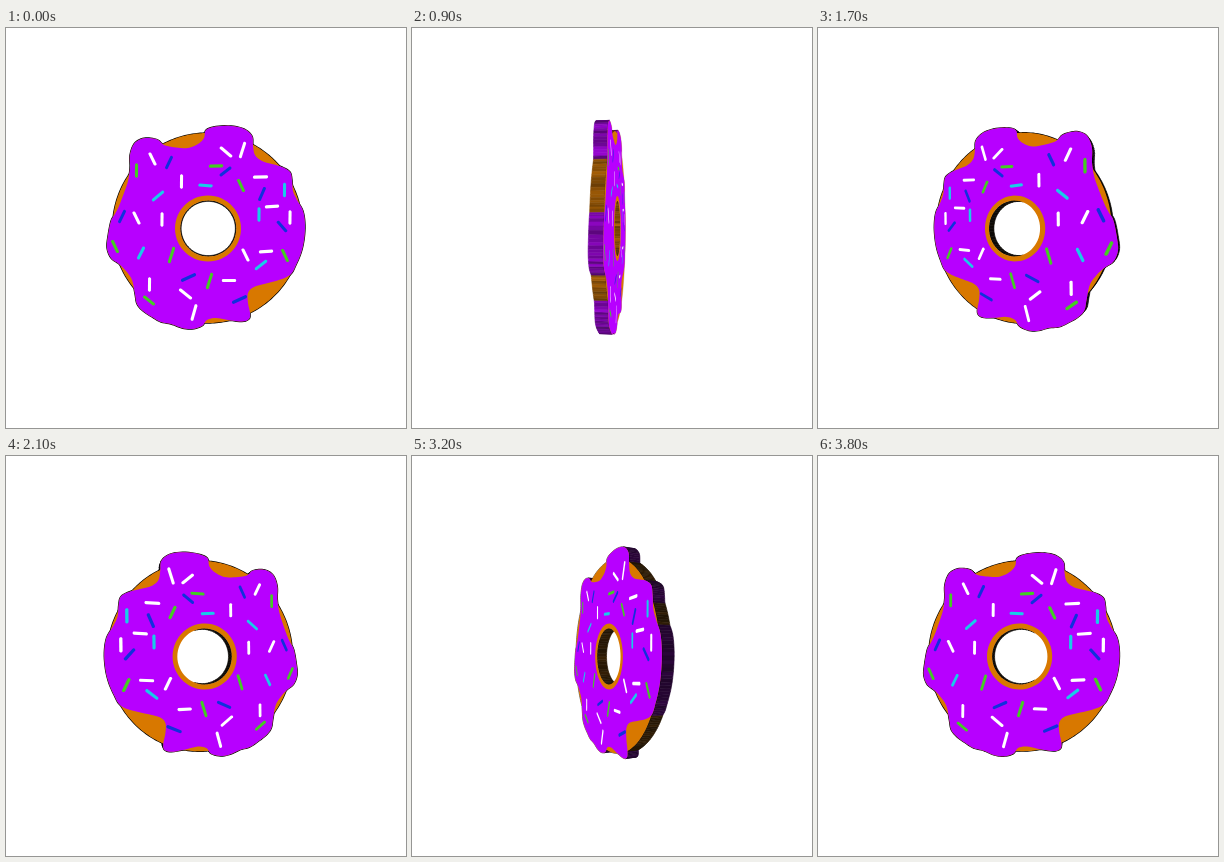
An HTML page with a canvas for the animation above (3900 ms loop, 400 by 400 pixels).

```html
<!DOCTYPE html>
<html lang="en">
<head>
<meta charset="utf-8">
<title>Spinning doughnut</title>
<style>
  html, body { margin: 0; width: 100%; height: 100%; overflow: hidden; background: #fff; }
  canvas { display: block; }
</style>
</head>
<body>
<canvas id="stage" width="400" height="400"></canvas>
<script>
const ctx = document.getElementById('stage').getContext('2d');
const STEPS = 39, STEP_MS = 100;
const CAMERA = 345, HALF_DEPTH = 5.5;
const FRONT_SCALE = CAMERA / (CAMERA - HALF_DEPTH);
const ICING = [183, 0, 255], DOUGH = [216, 120, 0];
const TAU = Math.PI * 2;

// Shapes are given as they appear on the stage when the front faces the viewer.
const toModel = ([x, y]) => [(x - 200) / FRONT_SCALE, (y - 200) / FRONT_SCALE];

const icingKnots = [
  [200, 102], [210, 98.5], [225, 98], [238, 101], [246, 108], [247, 118], [249, 127],
  [256, 133], [266, 136], [276, 139], [284, 144], [286, 152], [287, 163], [291, 172],
  [297, 183], [299, 197], [298, 212], [295, 225], [290, 237], [285, 246], [276, 251],
  [262, 255], [248, 259], [242, 265], [242, 275], [244, 285], [243, 291], [236, 293.5],
  [222, 292], [210, 290], [201, 292], [196, 298], [186, 301], [176, 300], [165, 296],
  [155, 294], [146, 289], [137, 283], [131, 276], [129, 266], [126, 252], [120, 243],
  [113, 236], [105, 230], [101, 220], [102, 208], [105, 193], [109, 186], [113, 178],
  [118, 165], [122, 153], [124, 140], [124, 127], [128, 116], [135, 111], [143, 110],
  [152, 112], [158, 117], [170, 119.5], [182, 120], [192, 116], [198, 110]
];

// Each sprinkle: x, y, angle in degrees, optional half length.
const sprinkles = {
  '#ffffff': [
    [146.5, 131, 63], [220, 124, 40, 6.2], [236.5, 122, 107, 7], [175.5, 153.5, 90],
    [254.5, 149, -2, 6], [130.5, 190, 63], [156, 191.5, 90], [266, 178.5, -4],
    [284, 189.5, 90], [239.5, 227, 63], [260, 223.5, -4], [143.5, 256.5, 90],
    [179.5, 266, 38, 6.4], [188, 284.5, 105, 7], [223, 252.5, 0]
  ],
  '#44cc22': [
    [130.5, 142.5, 90], [210, 138, -2], [235, 157.5, 64], [109, 218.5, 64],
    [165.5, 227, 107, 7], [279, 227.5, 64], [203.5, 253, 107, 7], [143, 272.5, 37]
  ],
  '#1030dd': [
    [163, 134.5, 115], [219.5, 143.5, 141], [256, 166, 113, 6], [116, 188.5, 115],
    [276, 198.5, 48], [182.5, 249.5, 155, 6.6], [233.5, 271.5, 155, 6.6]
  ],
  '#18cce8': [
    [199.5, 157.5, 3], [278.5, 162, 90], [152, 168, 140, 6], [253, 186.5, 90],
    [135, 225, 116], [255, 237, 141, 6]
  ]
};

function smooth(knots, parts) {
  const n = knots.length, out = [];
  for (let i = 0; i < n; i++) {
    const [a, b, c, d] = [n - 1, 0, 1, 2].map(k => knots[(i + k) % n]);
    for (let j = 0; j < parts; j++) {
      const t = j / parts;
      out.push([0, 1].map(k => b[k] + 0.5 * t * (c[k] - a[k] +
        t * (2 * a[k] - 5 * b[k] + 4 * c[k] - d[k] +
        t * (3 * (b[k] - c[k]) + d[k] - a[k])))));
    }
  }
  return out;
}

const circle = (cx, cy, r, n) => Array.from({ length: n }, (_, i) =>
  toModel([cx + r * Math.cos(i / n * TAU), cy - r * Math.sin(i / n * TAU)]));

function capsule([x, y, degrees, half = 5.6]) {
  const turn = degrees * Math.PI / 180, c = Math.cos(turn), s = Math.sin(turn);
  return Array.from({ length: 14 }, (_, i) => {
    const a = (i + 0.5) / 14 * TAU;
    const u = 1.6 * Math.cos(a) + Math.sign(Math.cos(a)) * half, v = 1.6 * Math.sin(a);
    return toModel([x + u * c - v * s, y + u * s + v * c]);
  });
}

const icing = smooth(icingKnots, 5).map(toModel);
const [midX, midY] = toModel([201.5, 200]);
const doughRadius = 95 / FRONT_SCALE;
const radius = ([x, y]) => Math.hypot(x - midX, y - midY);
const bare = icing.map(p => radius(p) < doughRadius);
const body = icing.map(p => {
  const k = Math.max(1, doughRadius / radius(p));
  return [midX + (p[0] - midX) * k, midY + (p[1] - midY) * k];
});
const hole = circle(202.3, 200.5, 28, 60);
const ring = circle(202, 200.5, 33, 60);
const capsules = Object.entries(sprinkles).map(([color, list]) => [color, list.map(capsule)]);

const grain = i => {
  const v = Math.sin(i * 12.9898) * 43758.5453;
  return v - Math.floor(v);
};

function draw(angle) {
  const cos = Math.cos(angle), sin = Math.sin(angle);
  const faceZ = cos > 0 ? HALF_DEPTH : -HALF_DEPTH;
  const light = Math.abs(sin) ** 14;

  const project = ([x, y], z) => {
    const depth = z * cos - x * sin, k = CAMERA / (CAMERA - depth);
    return [200 + (x * cos + z * sin) * k, 200 + y * k];
  };
  const trace = points => {
    points.forEach(([x, y], i) => i ? ctx.lineTo(x, y) : ctx.moveTo(x, y));
    ctx.closePath();
  };
  const fillFace = (color, ...shapes) => {
    ctx.beginPath();
    shapes.forEach(shape => trace(shape.map(p => project(p, faceZ))));
    ctx.fillStyle = color;
    ctx.fill('evenodd');
  };

  const walls = [];
  const addWalls = (outline, colorAt) => outline.forEach((p, i) => {
    const q = outline[(i + 1) % outline.length];
    const quad = [project(p, HALF_DEPTH), project(q, HALF_DEPTH),
                  project(q, -HALF_DEPTH), project(p, -HALF_DEPTH)];
    const [a, b, c, d] = quad;
    if ((c[0] - a[0]) * (d[1] - b[1]) - (c[1] - a[1]) * (d[0] - b[0]) >= 0) return;
    const dx = q[0] - p[0], dy = q[1] - p[1];
    const facing = Math.abs(dy * sin) / (Math.hypot(dx, dy) || 1);
    const shade = (0.04 + 0.72 * light * (0.45 + 0.55 * facing)) * (0.65 + 0.5 * grain(i));
    walls.push({ quad, near: -p[0] * sin, color: `rgb(${colorAt(i).map(v => Math.round(v * shade + 6))})` });
  });
  addWalls(body, i => bare[i] ? DOUGH : ICING);
  addWalls(hole, () => DOUGH);
  walls.sort((a, b) => a.near - b.near);

  ctx.fillStyle = '#fff';
  ctx.fillRect(0, 0, 400, 400);
  ctx.lineWidth = 0.6;
  for (const { quad, color } of walls) {
    ctx.beginPath();
    trace(quad);
    ctx.fillStyle = ctx.strokeStyle = color;
    ctx.fill();
    ctx.stroke();
  }

  ctx.beginPath();
  trace(body.map(p => project(p, faceZ)));
  ctx.strokeStyle = '#000';
  ctx.lineWidth = 1.4 * Math.abs(cos);
  ctx.stroke();

  fillFace(`rgb(${DOUGH})`, body, hole);
  fillFace(`rgb(${ICING})`, icing, ring);
  for (const [color, shapes] of capsules) {
    shapes.forEach(shape => fillFace(color, shape));
  }
}

function tick() {
  const step = Math.floor(performance.now() / STEP_MS) % STEPS;
  draw(step / STEPS * TAU);
  requestAnimationFrame(tick);
}
tick();
</script>
</body>
</html>
```
